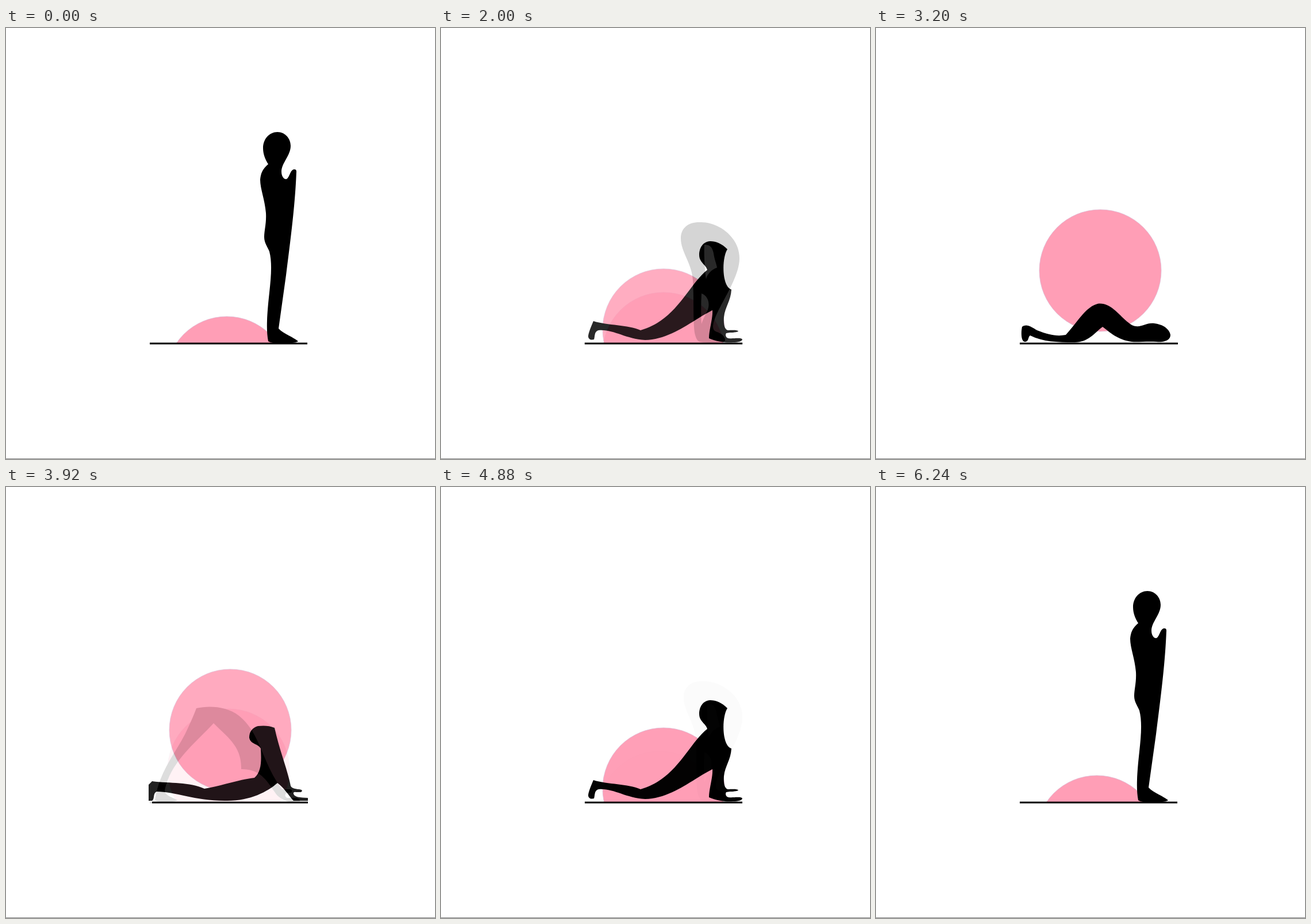
Animation, 746 px wide and 750 px high, one loop 6560 ms. Source, as an HTML page:

```html
<!DOCTYPE html>
<html lang="en">
<head>
<meta charset="utf-8">
<title>Sun salutation</title>
<style>
  html, body { margin: 0; width: 100%; height: 100%; overflow: hidden; background: #fff; }
  svg { display: block; width: 746px; height: 750px; }
  .sun { fill: #ff9eb6; stroke: #d9bcd6; stroke-width: .7; }
</style>
</head>
<body>
<svg id="stage" viewBox="0 0 746 750">
  <defs>
    <clipPath id="sky"><rect x="240" y="300" width="300" height="248"/></clipPath>
  </defs>
  <g id="poses"></g>
  <rect y="749" width="746" height="1" fill="#858585"/>
</svg>
<script>
const LOOP = 6560, STEP = 80, FADE = 180;

const shapes = {
  stand: `M505 250C503 300 498 345 487 430L474 523C482 532 500 538 508 545C503 550 462 551 456 545
    C452 525 454 497 458 460C461 432 463 408 458 389C455 381 449 374 449 364C449 352 453 340 452 322
    C450 298 442 280 442 264C443 250 449 243 456 237C450 228 447 218 447 209C447 193 458 181 472 181
    C486 181 495 193 495 205C495 222 479 235 479 250C479 258 483 263 487 263C493 262 494 246 501 246
    C504 246 505 247 505 250Z`,
  arch: `M311 260C316 246 328 241 343 244C362 248 380 258 398 263C432 269 462 276 483 293
    C503 310 512 335 512 368C512 400 499 426 487 453C476 477 467 497 465 527C468 533 481 531 490 536
    C496 540 496 544 490 547C475 549 455 549 448 545C449 520 456 497 460 470C466 430 474 390 474 350
    C467 338 452 322 438 308C433 317 426 320 418 320C407 320 392 306 391 296C390 288 395 285 398 279
    C387 262 357 257 311 260Z`,
  fold: `M417 366C417 348 430 338 449 338C480 336 519 362 519 401C519 440 473 495 473 520
    C474 530 480 527 488 533C494 538 497 545 490 547C475 549 458 548 450 546C446 545 443 540 441 530
    C438 510 440 470 438 440C437 410 417 390 417 366Z
    M458 377C468 377 472 382 474 392C476 405 479 410 480 417C470 420 462 430 461 437
    C459 425 457 395 458 377Z
    M453 462C464 466 468 478 464 490C460 500 456 505 453 515C452 500 452 480 453 462Z`,
  lunge: `M498 385C488 375 478 371 468 371C455 372 449 383 449 395C449 408 461 412 463 421
    C430 447 410 508 347 526C325 516 290 518 265 510C261 520 256 531 256 537C257 543 262 543 266 542
    C268 537 266 528 274 526C300 524 320 541 355 543C400 542 435 510 472 491C473 505 466 525 466 540
    C480 546 495 548 508 547C516 547 524 545 524 542C522 538 510 541 500 540C495 539 494 534 496 531
    C502 529 510 531 517 528C516 525 505 526 499 526C494 525 491 518 492 503C494 485 504 475 505 455
    C488 450 488 400 498 385Z`,
  dog: `M332 385C356 380 385 382 406 398C444 428 446 480 481 526L496 526C499 527 499 531 496 532L489 532
    C485 535 486 541 492 541L505 541C510 541 513 545 512 548L500 549C488 547 480 543 473 537
    C458 519 448 490 410 491C411 450 385 435 362 411C330 446 287 478 277 528C277 537 291 540 299 545
    C290 550 270 550 260 545C268 490 300 460 318 418C324 405 328 396 332 385Z`,
  knees: `M254 520C262 514 270 520 280 526C300 534 315 537 330 534C350 512 365 485 385 480
    C410 476 425 505 445 517C460 524 468 512 484 514C500 516 510 524 512 534C512 544 500 547 488 546
    C470 545 455 547 445 546C420 543 405 528 394 520C380 530 370 547 345 547C315 547 290 546 268 535
    C264 538 266 545 260 546C252 547 252 530 254 520Z`,
  cobra: `M467 419C458 415 447 415 438 416C428 419 423 426 423 436C425 448 438 446 443 455
    C444 475 445 495 432 506C405 509 375 520 345 525C320 513 285 516 254 512L248 518V546H254
    C259 543 255 533 262 530C295 530 330 547 385 546C425 546 455 530 472 515C485 525 490 535 500 546
    H525V541C515 540 508 541 502 537C498 533 500 530 504 531L513 531C517 528 514 526 508 526
    C500 525 496 523 495 520C489 490 476 460 467 419Z`
};

// start of fade-in, shape, sun centre, body shift, left and right end of the ground
const poses = [
  [-FADE, 'stand', 384, 608, 0, 250, 524],
  [805, 'arch', 387, 592, 0, 249, 525],
  [1288, 'fold', 387, 566, 0, 249, 525],
  [1850, 'lunge', 387, 525, 0, 250, 524],
  [2330, 'dog', 388, 493, 0, 250, 525],
  [2850, 'knees', 390, 422, 0, 250, 525],
  [3380, 'cobra', 390, 423, 0, 254, 525],
  [3897, 'dog', 387, 492, -1, 250, 525],
  [4390, 'lunge', 387, 525, 0, 250, 524],
  [4878, 'fold', 380, 566, 5, 250, 524],
  [5363, 'arch', 385, 591, -2, 248, 522],
  [5865, 'stand', 384, 608, 0, 250, 524]
];

// Opaque layers: fading one in over the last gives a plain cross-fade.
const root = document.getElementById('poses');
root.innerHTML = poses.map(([, name, x, y, dx, left, right]) => `<g>
  <rect width="746" height="749" fill="#fff"/>
  <circle class="sun" cx="${x}" cy="${y}" r="106" clip-path="url(#sky)"/>
  <path d="${shapes[name]}" fill-rule="evenodd" transform="translate(${dx})"/>
  <rect x="${left}" y="547.5" width="${right - left}" height="3"/>
</g>`).join('');

const layers = [...root.children];

function draw(now) {
  const t = Math.floor((now % LOOP) / STEP) * STEP;
  layers.forEach((layer, i) => {
    const shown = Math.min(1, Math.max(0, (t - poses[i][0]) / FADE));
    layer.style.opacity = shown;
    layer.style.display = shown ? '' : 'none';
  });
}

let start;
function tick(now) {
  start ??= now;
  draw(now - start);
  requestAnimationFrame(tick);
}
draw(0);
requestAnimationFrame(tick);
</script>
</body>
</html>
```
